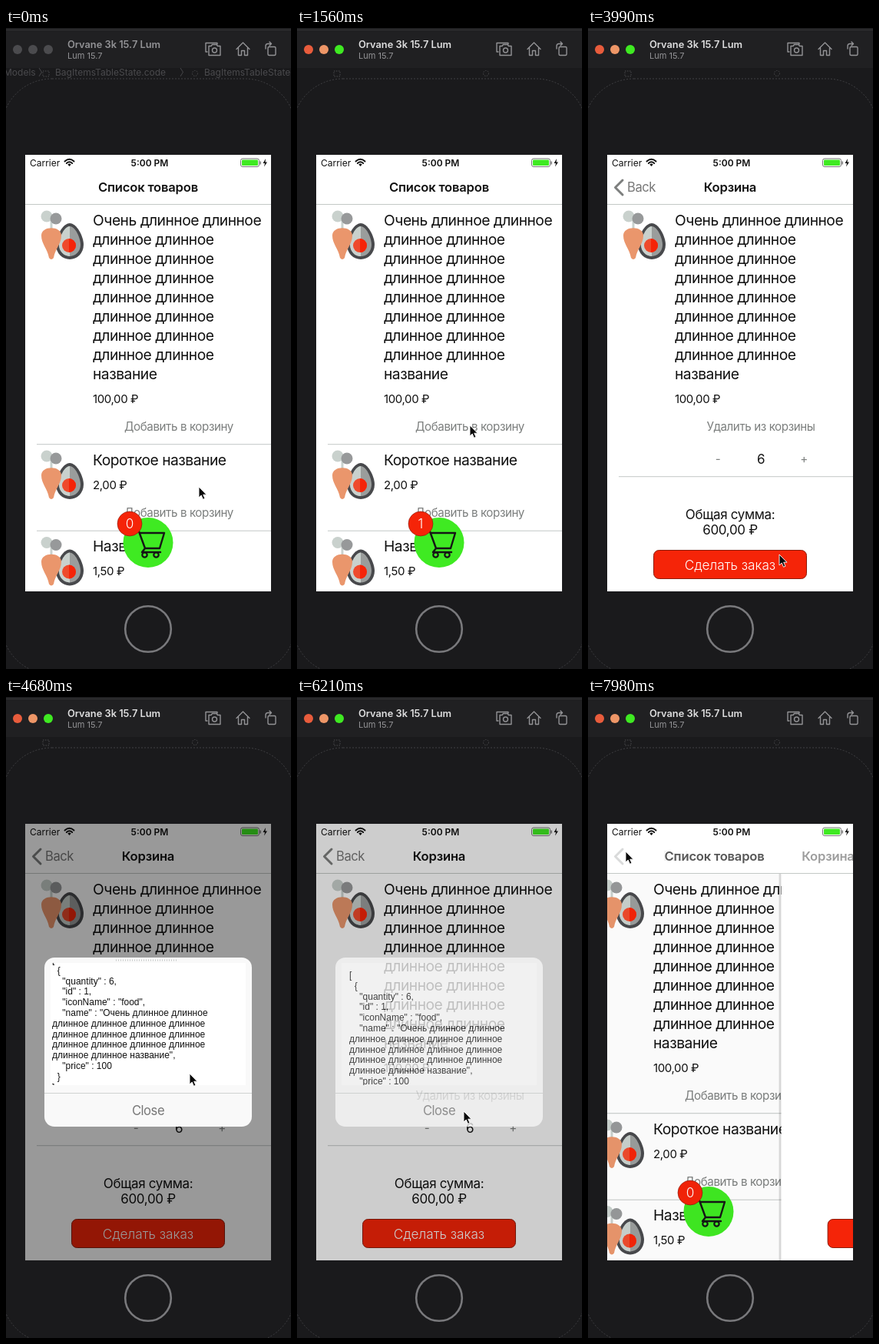
These frames come from a looping animation (371x834 px, 8 s). An HTML page:

```html
<!DOCTYPE html>
<html lang="ru">
<head>
<meta charset="utf-8">
<title>Корзина</title>
<style>
html, body { margin: 0; width: 100%; height: 100%; overflow: hidden; background: #1a1a1c; }
#stage { display: block; width: 371px; height: 834px; }
text { font-family: Inter, "Open Sans", sans-serif; white-space: pre; fill: #111; }
.name { font-size: 19.3px; letter-spacing: -.026em; }
.price { font-size: 15px; letter-spacing: -.025em; }
.link { font-size: 15.2px; letter-spacing: -.028em; fill: #7c7f7e; text-anchor: middle; }
.title { font-size: 16.6px; font-weight: 600; letter-spacing: -.012em; text-anchor: middle; }
.back { font-size: 16.6px; letter-spacing: -.028em; fill: #777; }
.total { font-size: 17px; letter-spacing: -.02em; text-anchor: middle; }
.order { font-size: 17.2px; font-weight: 300; fill: #fff; text-anchor: middle; }
.status { font-size: 12px; }
.json { font-family: "Liberation Sans", Arial, sans-serif; font-size: 12px; }
#editor text { fill: #4a4a4d; }
</style>
</head>
<body>
<svg id="stage" viewBox="0 0 371 834"></svg>
<script>
const LOOP = 8000;
const RED = '#f52408', GREEN = '#3fea22', RULE = '#c3c8c6';
const LONG_NAME = ['Очень длинное длинное', ...Array(7).fill('длинное длинное'), 'название'];

const text = (x, y, cls, str, attrs = '') =>
  `<text x="${x}" y="${y}" class="${cls}" ${attrs}>${str}</text>`;
const rect = (x, y, w, h, fill, attrs = '') =>
  `<rect x="${x}" y="${y}" width="${w}" height="${h}" fill="${fill}" ${attrs}/>`;
const circle = (x, y, r, fill, attrs = '') =>
  `<circle cx="${x}" cy="${y}" r="${r}" fill="${fill}" ${attrs}/>`;
const path = (d, attrs) => `<path d="${d}" ${attrs}/>`;
const group = (id, body) => `<g id="${id}">${body}</g>`;
const line = (color, width) =>
  `fill="none" stroke="${color}" stroke-width="${width}" stroke-linecap="round" stroke-linejoin="round"`;

const food = y => `<g transform="translate(45 ${y})">
  ${path('M38 17C47 17 56 34 56 45A18 19 0 0 1 20 45C20 34 29 17 38 17Z', 'fill="#48494c"')}
  ${path('M38 21C45 21 52 36 52 45A14 15 0 0 1 24 45C24 36 31 21 38 21Z', 'fill="#9a9d9c"')}
  ${path('M38 21C31 21 24 36 24 45A14 15 0 0 0 38 60Z', 'fill="#c9d1cd"')}
  ${circle(37, 46, 9, '#ee4a2c')}${path('M37 37A9 9 0 0 1 37 55Z', `fill="${RED}"`)}
  ${path('M14 24V8', line('#c9d1cd', 3))}
  ${circle(8, 8, 7.5, '#c9d1cd')}${circle(20, 11, 7.5, '#97999a')}
  ${path('M1 33C1 20 27 20 27 33C27 44 19 50 17 62Q14 66 11 62C9 50 1 44 1 33Z', 'fill="#ea966c"')}
</g>`;

const row = (top, height, lines, price, link) => {
  const end = top + 7.5 + lines.length * 25;
  return food(top + 7) +
    lines.map((s, i) => text(113, top + 26.5 + i * 25, 'name', s)).join('') +
    text(113, end + 25, 'price', price) +
    text(225, end + 61.5, 'link', link) +
    rect(40, top + height - .8, 305, 1, RULE);
};

const ADD = 'Добавить в корзину';
const listPage =
  rect(25, 165, 320, 568, '#fff') +
  group('rows',
    row(230, 312, LONG_NAME, '100,00 ₽', ADD) +
    row(542, 112.5, ['Короткое название'], '2,00 ₽', ADD) +
    row(654.5, 112.5, ['Название'], '1,50 ₽', ADD) +
    row(767, 112.5, ['Название'], '3,00 ₽', ADD)) +
  rect(339, 232, 3, 375, '#8b8e8d', 'id="bar" rx="1.5"') +
  circle(185, 669.5, 32.5, GREEN) +
  path('M167 655H173L181 677H200L206 657H174M181 677L177 682H201', line('#151515', 2.4)) +
  circle(180.5, 685.5, 3.2, 'none', 'stroke="#151515" stroke-width="2.2"') +
  circle(195.5, 685.5, 3.2, 'none', 'stroke="#151515" stroke-width="2.2"') +
  circle(161, 645, 16, RED, 'stroke="#7c1a0c" stroke-width=".6"') +
  text(161, 651, 'order', '0', 'id="badge"');

const cartPage =
  rect(22, 230, 3, 503, '#000', 'opacity=".14"') +
  rect(25, 165, 320, 568, '#fff') +
  group('cartRow',
    row(230, 354, LONG_NAME, '100,00 ₽', 'Удалить из корзины') +
    text(169, 566, 'link', '-') + text(281, 566, 'link', '+') +
    text(225, 566.5, 'total', '1', 'id="count"')) +
  text(185, 639, 'total', 'Общая сумма:') +
  text(185, 659, 'total', '', 'id="sum"') +
  rect(85.5, 679.5, 199, 37, RED, 'rx="7" stroke="#8c1c0c"') +
  text(185, 705, 'order', 'Сделать заказ');

const navigation =
  rect(25, 165, 320, 65, '#fff') + rect(25, 229, 320, 1, RULE) +
  text(31, 179.5, 'status', 'Carrier') +
  path('M76.5 173.5Q82.5 168 88.5 173.5M78.8 176Q82.5 172.7 86.2 176', line('#111', 1.9)) +
  path('M80.3 177.5Q82.5 175.5 84.7 177.5L82.5 180Z', 'fill="#111"') +
  text(187, 179.5, 'status', '5:00 PM', 'font-weight="600" text-anchor="middle"') +
  rect(305.5, 170, 24, 10.5, '#fff', 'rx="2.5" stroke="#777"') +
  rect(307, 171.5, 21, 7.5, GREEN, 'rx="1"') + rect(330.5, 173.5, 1.5, 4, '#777') +
  path('M338 170L334.5 176H337L336 180.5L340 174.5H337.5Z', 'fill="#111"') +
  text(185, 213, 'title', 'Список товаров', 'id="listTitle"') +
  text(185, 213, 'title', 'Корзина', 'id="cartTitle"') +
  path('M45 198L35.5 207.5L45 217', 'id="chevron" ' + line('#7d7f7e', 3)) +
  text(51, 213, 'back', 'Back', 'id="back"');

const words = 'длинное длинное длинное длинное';
const json = ['[', '  {', '    "quantity" : 6,', '    "id" : 1,', '    "iconName" : "food",',
  '    "name" : "Очень длинное длинное', words, words, words,
  'длинное длинное название",', '    "price" : 100', '  }', ']'];
const alertBox =
  rect(50, 339, 270, 220, '#f9f9f9', 'rx="13"') +
  `<svg x="58" y="346" width="254" height="159" viewBox="58 346 254 159">
    ${rect(58, 346, 254, 159, '#fff')}
    ${group('json', json.map((s, i) => text(68, 366 + i * 13.8, 'json', s)).join(''))}
  </svg>` +
  path('M143 342.5H224', 'id="grip" stroke="#c5c8c7" stroke-width="2" stroke-dasharray="1 2"') +
  rect(50, 515, 270, 1, '#d0d3d2') +
  text(185, 543.5, 'back', 'Close', 'text-anchor="middle"');

const windowChrome =
  rect(0, 0, 371, 834, '#1a1a1c') + rect(0, 0, 371, 52, '#202022') + rect(0, 2, 371, 1, '#343437') +
  group('editor',
    text(-3, 62, 'status', 'Models 〉') +
    text(64, 62, 'status', 'BagItemsTableState.code') +
    text(226, 62, 'status', '〉') +
    text(258, 62, 'status', 'BagItemsTableState')) +
  rect(48, 56, 8, 7, 'none', 'stroke="#4a4a4d" stroke-dasharray="1.5 1.5"') +
  circle(246, 59, 3.5, 'none', 'stroke="#4a4a4d" stroke-dasharray="1.5 1.5"') +
  rect(-6, 66, 383, 775, '#1a1a1c', 'rx="66" stroke="#414144" stroke-dasharray="2 2"') +
  [15, 35, 55].map(x => circle(x, 28, 6, '#4b4b4e', 'class="light"')).join('') +
  text(80, 26, '', 'Orvane 3k 15.7 Lum', 'id="device" font-size="12.8" font-weight="600"') +
  text(80, 40, '', 'Lum 15.7', 'font-size="11" style="fill:#929295"') +
  `<g ${line('#929295', 1.4)}>
    <path d="M262 31H260V19.5H275V21M264 23.5H267L268.5 21.5H274L275.5 23.5H279V35.5H264Z"/>
    <circle cx="271.5" cy="29" r="3"/>
    <path d="M300 27.5L308.5 19L317 27.5M302.5 26V35.5H306.5V29.5H310.5V35.5H314.5V26"/>
    <rect x="341" y="24.5" width="10" height="11" rx="1.5"/>
    <path d="M338 27V23.5Q338 20.5 341 20.5H345M343 18L345.5 20.5L343 23"/>
  </g>` +
  circle(185, 782, 29.8, 'none', 'stroke="#79797c" stroke-width="2.6"');

document.getElementById('stage').innerHTML = windowChrome +
  `<svg x="25" y="165" width="320" height="568" viewBox="25 165 320 568">
    ${group('list', listPage)}
    ${rect(25, 165, 320, 568, 'rgb(0,35,18)', 'id="pageDim"')}
    ${group('cart', cartPage)}
    ${navigation}
    ${rect(25, 165, 320, 568, '#000', 'id="modalDim"')}
    ${group('alert', alertBox)}
  </svg>` +
  path('M0 0V14L3.2 11L5.5 16.3L8 15.2L5.7 10.2H10Z',
    'id="cursor" fill="#0a0a0a" stroke="#fff" stroke-width=".9"');

const el = Object.fromEntries([...document.querySelectorAll('[id]')].map(e => [e.id, e]));
const lights = document.querySelectorAll('.light');

const clamp = u => Math.max(0, Math.min(1, u));
const smooth = (t, from, to) => { const u = clamp((t - from) / (to - from)); return u * u * (3 - 2 * u); };
const spring = ms => { const x = Math.max(0, ms) * .014; return 1 - (1 + x) * Math.exp(-x); };
const move = (e, x, y = 0) => e.setAttribute('transform', `translate(${x} ${y})`);
const show = (e, opacity) => e.setAttribute('opacity', opacity);

// Pointer stops: time, x, y
const stops = [[120, 251, 597], [810, 231, 626], [900, 231, 628], [1100, 231, 628], [1450, 225, 517],
  [1650, 225, 517], [2050, 193, 645], [2480, 193, 645], [2950, 281, 558], [3670, 281, 558],
  [3960, 249, 685], [4200, 249, 685], [4660, 239, 490], [4780, 239, 490], [5250, 241, 512],
  [5650, 239, 510], [6030, 217, 539], [6690, 217, 539], [7050, 190, 490], [7230, 190, 490], [7700, 49, 201]];
const taps = [3050, 3200, 3350, 3500, 3650];

function pointerAt(t) {
  let [, x, y] = stops[0];
  for (let i = 1; i < stops.length; i++) {
    const [t0, x0, y0] = stops[i - 1], [t1, x1, y1] = stops[i];
    const u = smooth(t, t0, t1);
    x += (x1 - x0) * u;
    y += (y1 - y0) * u;
  }
  return [x, y];
}

function draw(t) {
  const active = t >= 120;
  lights.forEach((e, i) => e.setAttribute('fill', active ? ['#e85c3c', '#ee9667', GREEN][i] : '#4b4b4e'));
  el.device.style.fill = active ? '#dededf' : '#929295';
  show(el.editor, active ? 0 : 1);

  const pull = 21 * smooth(t, 150, 790) * (1 - spring(t - 900));
  move(el.rows, 0, pull);
  el.bar.setAttribute('height', 396 - pull);
  show(el.bar, smooth(t, 150, 250) * (1 - smooth(t, 1250, 1500)));
  el.badge.textContent = t >= 1560 && t < 6430 ? 1 : 0;

  // 0 shows the list, 1 shows the cart
  const push = spring(t - 2156) - spring(t - 7804), rest = 1 - push;
  move(el.list, -96 * push);
  move(el.cart, 320 * rest + (push < .001 ? 10 : 0));
  show(el.pageDim, .25 * push * push);
  move(el.listTitle, -70 * push);
  show(el.listTitle, rest);
  move(el.cartTitle, 180 * rest);
  show(el.cartTitle, clamp(push * 1.4));
  move(el.back, 66 * rest);
  show(el.back, push * push);
  show(el.chevron, push);

  const ordered = t >= 6430;
  const count = ordered ? 0 : 1 + taps.filter(tap => t >= tap).length;
  el.count.textContent = count;
  el.sum.textContent = count ? `${count}00,00 ₽` : '0,00 ₽';
  show(el.cartRow, ordered ? 0 : 1);

  const appear = smooth(t, 4130, 4400);
  const scale = 1.15 - .15 * appear;
  show(el.modalDim, .4 * appear * (1 - smooth(t, 6080, 6340)));
  show(el.alert, appear * (1 - smooth(t, 6100, 6430)));
  el.alert.setAttribute('transform', `translate(185 449) scale(${scale}) translate(-185 -449)`);
  const scrolled = 1 - smooth(t, 4780, 5250);
  move(el.json, -8 * scrolled, -20 * scrolled);
  show(el.grip, scrolled);

  move(el.cursor, ...pointerAt(t));
}

const start = performance.now();
(function frame() {
  draw((performance.now() - start) % LOOP);
  requestAnimationFrame(frame);
})();
</script>
</body>
</html>
```
